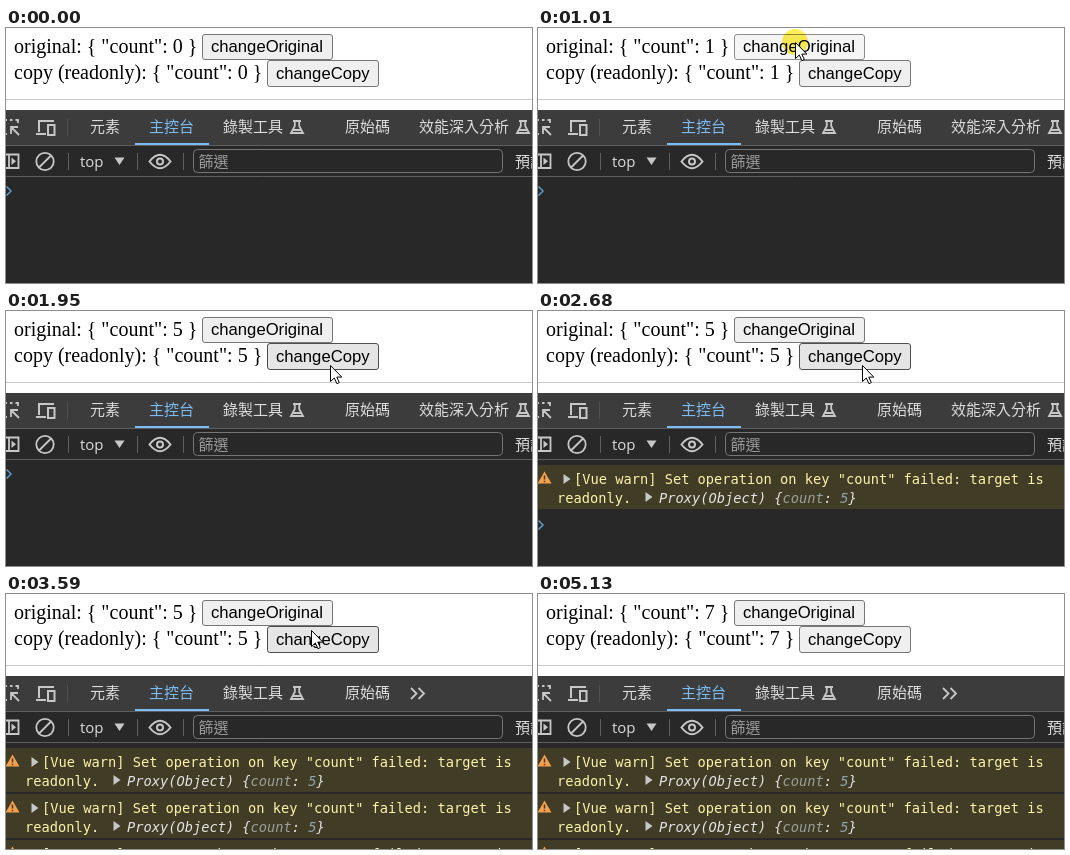
An HTML page for the animation above (5.4 s loop, 526 px wide and 255 px high).

```html
<!DOCTYPE html>
<html lang="zh-Hant">
<head>
<meta charset="utf-8">
<title>readonly</title>
<style>
html, body { margin: 0; width: 100%; height: 100%; overflow: hidden; background: #fff; }
svg { display: block; }
text { white-space: pre; }
.page { font: 20px "Liberation Serif", serif; }
.btn rect { fill: #efefef; stroke: #767676; }
.btn text { font: 16.67px "Liberation Sans", sans-serif; }
.btn.hover rect { fill: #e5e5e5; stroke: #4f4f4f; }
.btn.down rect { fill: #f5f5f5; stroke: #8d8d8d; }
.ui { font: 15px "Noto Sans CJK TC", "Noto Sans CJK", sans-serif; fill: #dcdcdc; }
.icon { fill: none; stroke: #c7c7c7; stroke-width: 1.8; }
.solid { fill: #c7c7c7; }
.mono { font: 13.7px "DejaVu Sans Mono", monospace; fill: #fdf3aa; }
.obj { font-style: italic; fill: #e3e3e3; }
.key { fill: #9aa09a; }
.num { fill: #8fa5ad; }
#halo { fill: #fff055; mix-blend-mode: multiply; }
</style>
</head>
<body>
<svg width="526" height="255" viewBox="0 0 526 255">
  <defs>
    <path id="flask" class="icon" d="M-4-6H4M-2.2-6V-1L-6 6H6L2.2-1V-6M-4 3H4"/>
    <g id="warn">
      <rect width="526" height="44" fill="#413c26"/>
      <path d="M6.5 6.5L13.5 18.5H-.5Z" fill="#f5a04c"/>
      <path d="M6.5 10.5V14.5M6.5 15.7V17.2" stroke="#413c26" stroke-width="1.5"/>
      <path class="solid" d="M25.5 9V19L32.500 14ZM107.500 27V37L114.500 32Z"/>
      <g class="mono">
        <text x="36" y="19">[Vue warn] Set operation on key "count" failed: target is</text>
        <text x="19" y="38">readonly.</text>
        <text x="121" y="38" class="obj">Proxy(Object) {<tspan class="key">count</tspan>: <tspan class="num">5</tspan>}</text>
      </g>
    </g>
  </defs>

  <g class="page">
    <text id="line1" x="8" y="25"></text>
    <text id="line2" x="8" y="51"></text>
  </g>
  <g class="btn" id="btn1">
    <rect x="196.500" y="6.500" width="130" height="25" rx="2.500"/>
    <text x="205" y="24">changeOriginal</text>
  </g>
  <g class="btn" id="btn2">
    <rect x="261.500" y="32.500" width="111" height="26" rx="2.500"/>
    <text x="270" y="50.500">changeCopy</text>
  </g>
  <path d="M0 71.500H526" stroke="#c8c8c8"/>

  <!-- console panel -->
  <rect y="82" width="526" height="173" fill="#282828"/>
  <rect y="82" width="526" height="35" fill="#3c3c3c"/>
  <path d="M0 117.500H526M0 148.500H526M62.500 125V142M131.500 125V142M177.500 125V142" stroke="#5e5e5e"/>
  <path d="M61.500 91V108" stroke="#505050"/>
  <rect x="129" y="115" width="74" height="2" fill="#7cbdf8"/>

  <g class="icon">
    <path d="M-1 92H1M4 92H6.500M9.500 92H12V95M-1 106H1M5 106V99H12M5 99L13 107"/>
    <path d="M33 104V93H48M30 106H40M42 97H48.500V107H42Z" stroke-width="2"/>
    <path d="M-2 126.500H12.500V140H-2M3 126.500V140"/>
    <circle cx="39" cy="133.500" r="8.700"/>
    <path d="M33 139.500L45 127.500"/>
    <path d="M143.500 133.500Q154 120 164.500 133.500Q154 147 143.500 133.500Z" stroke-width="2"/>
    <circle cx="154" cy="133.500" r="3" stroke-width="2"/>
  </g>
  <path class="solid" d="M5.500 129.500V137L10 133.300ZM108.500 129.500H118.500L113.500 137Z"/>
  <rect x="187.500" y="121.500" width="309" height="23" rx="4" fill="#282828" stroke="#757575"/>

  <g class="ui">
    <text x="84" y="104">元素</text>
    <text x="143" y="104" fill="#7cbdf8">主控台</text>
    <text x="217" y="104">錄製工具</text>
    <text x="339" y="104">原始碼</text>
    <text x="74" y="138.500" style="font-family:'Open Sans',sans-serif">top</text>
    <text x="192.500" y="139" fill="#9a9a9a">篩選</text>
    <text x="509" y="139">預設</text>
  </g>
  <use href="#flask" x="291" y="99"/>
  <g id="lastTab">
    <text class="ui" x="413" y="104">效能深入分析</text>
    <use href="#flask" x="517" y="99"/>
  </g>
  <path id="more" class="icon" d="M405 94L410.500 99.500 405 105M412.500 94L418 99.500 412.500 105"/>

  <use class="row" href="#warn" y="154"/>
  <use class="row" href="#warn" y="200"/>
  <use class="row" href="#warn" y="246"/>
  <path id="prompt" d="M.5-4.500L5 0 .5 4.500" fill="none" stroke="#5b9bd0" stroke-width="1.500"/>

  <g id="cursor">
    <circle id="halo" r="13"/>
    <path d="M.5.500V16.500L4.300 13 6.900 18.700 9.300 17.600 6.800 12.100H11.800Z" fill="#fff" stroke="#000"/>
  </g>
</svg>
<script>
const LOOP = 5400;
const $ = id => document.getElementById(id);
const rows = document.querySelectorAll('.row');

// [start, end, steps, from x, y, to x, y, ease]
const out = p => 1 - (1 - p) ** 2;
const smooth = p => p * p * (3 - 2 * p);
const moves = [
  [130, 410, 4, 382, 140, 257, 14, out],
  [1750, 1950, 3, 257, 14, 324, 54, smooth],
  [3590, 3720, 2, 305, 36, 292, 19, out],
  [4650, 5060, 6, 292, 19, 491, 242, smooth]
];
const GONE = 5130;

// [press, halo, release]
const clicks1 = [
  [810, 810, 940], [1010, 1010, 1210], [1270, 1270, 1340], [1410, 1410, 1550],
  [1610, 1610, 1680], [3920, 3990, 4120], [4390, 4450, 4520]
];
const clicks2 = [[2610, 2610, 2680], [2810, 2810, 2880], [3020, 3020, 3190]];

const done = (clicks, t) => clicks.filter(c => t >= c[2]).length;
const held = (clicks, t, i) => clicks.some(c => t >= c[i] && t < c[2]);
const show = (el, on) => { el.style.display = on ? '' : 'none'; };

function pointer(t) {
  const move = moves.filter(m => t >= m[0]).pop();
  if (!move || t >= GONE) return null;
  const [start, end, steps, x0, y0, x1, y1, ease] = move;
  const step = Math.floor((t - start) / (end - start) * steps + 1e-6);
  const p = ease(Math.min(1, step / steps));
  return [x0 + (x1 - x0) * p, y0 + (y1 - y0) * p];
}

function drawButton(btn, pos, clicks, t, x, y, w, h) {
  const over = pos && pos[0] >= x && pos[0] < x + w && pos[1] >= y && pos[1] < y + h;
  btn.classList.toggle('hover', !!over);
  btn.classList.toggle('down', held(clicks, t, 0));
}

function draw(t) {
  const count = `{ "count": ${done(clicks1, t)} }`;
  $('line1').textContent = 'original: ' + count;
  $('line2').textContent = 'copy (readonly): ' + count;

  const pos = pointer(t);
  show($('cursor'), pos);
  if (pos) $('cursor').setAttribute('transform', `translate(${pos})`);
  show($('halo'), held(clicks1, t, 1) || held(clicks2, t, 1));
  drawButton($('btn1'), pos, clicks1, t, 196, 6, 131, 26);
  drawButton($('btn2'), pos, clicks2, t, 261, 32, 112, 27);

  const warnings = done(clicks2, t);
  rows.forEach((row, i) => show(row, i < warnings));
  $('prompt').setAttribute('transform', `translate(0 ${warnings ? 168 + 46 * warnings : 163})`);
  show($('lastTab'), t < 2740);
  show($('more'), t >= 2740);
}

const begin = performance.now();
function tick() {
  draw((performance.now() - begin) % LOOP);
  requestAnimationFrame(tick);
}
tick();
</script>
</body>
</html>
```
